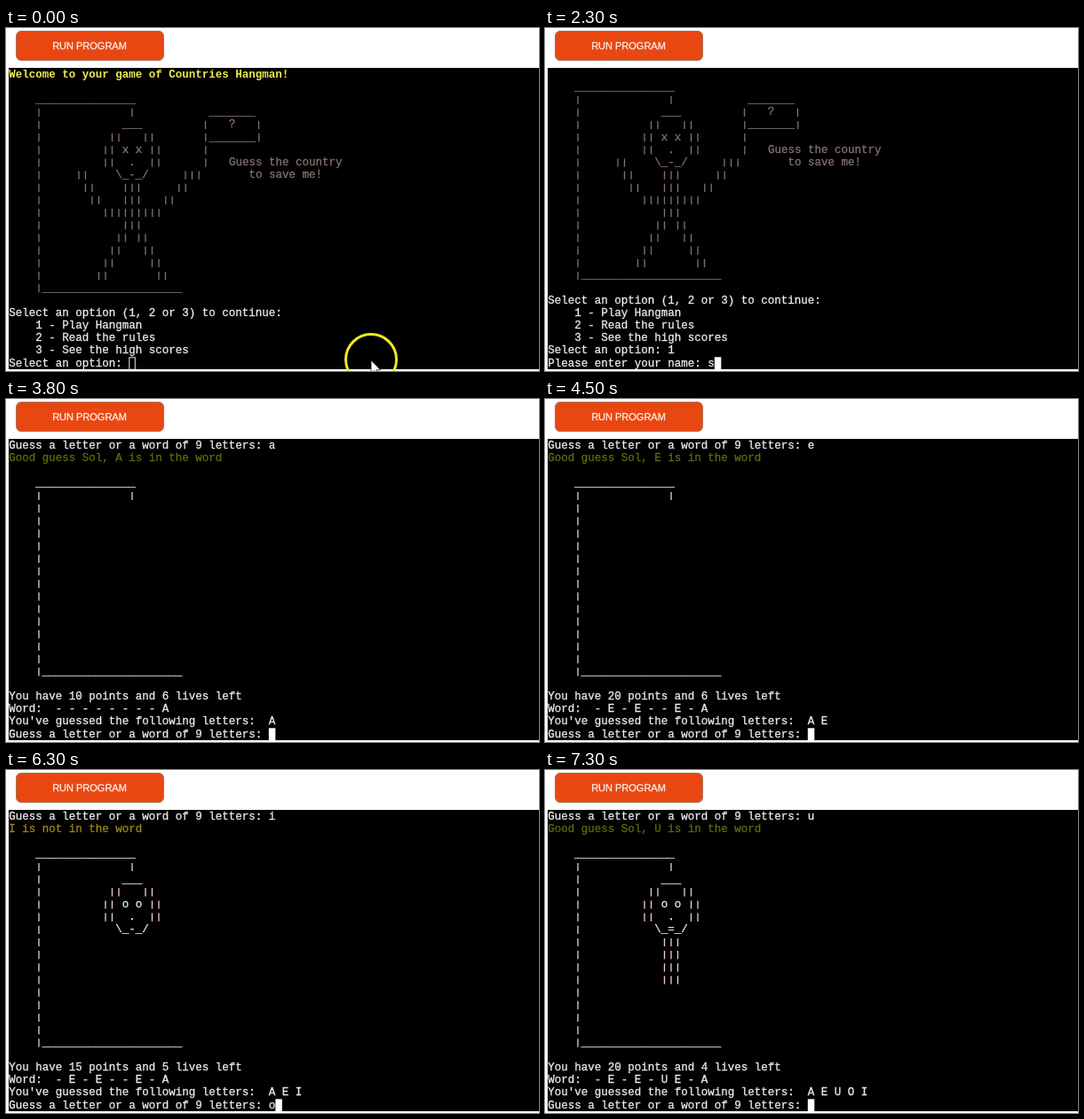
Animation of 600x387 px, one loop 8000 ms. Source, as an HTML page:

```html
<!DOCTYPE html>
<html lang="en">
<head>
<meta charset="utf-8">
<title>Countries Hangman</title>
<style>
html, body { margin: 0; width: 100%; height: 100%; overflow: hidden; background: #fff; }
#run {
  position: absolute; left: 10.5px; top: 3px; width: 167px; height: 33.5px; box-sizing: border-box;
  border: 1px solid #a8765a; border-radius: 6px; background: #e94711; color: #fdeee6;
  font: 11px/32px "Liberation Sans", Arial, sans-serif; text-align: center;
  -webkit-text-stroke: .3px;
}
#term { position: absolute; left: 2.5px; top: 45px; width: 598px; height: 340px; background: #000; overflow: hidden; }
/* double size, then halved, for exact 7.5px columns */
pre {
  margin: 0; width: 1196px; transform: translate(.3px, .8px) scale(.5); transform-origin: 0 0; color: #ececec;
  font: 25px/28.33px "Liberation Mono", "Courier New", monospace;
  -webkit-text-stroke: .6px;
}
pre div { height: 28.33px; }
i { display: inline-block; font-style: normal; color: #f0ccd0; clip-path: inset(5px 0); }
.dim, .dim i { color: #84716f; }
.title { color: #efeb50; font-weight: bold; -webkit-text-stroke: 0; }
.good { color: #566e10; }
.bad { color: #a0841c; }
.on { background: #fff; }
.off { box-shadow: inset 0 0 0 2px #e8e8e8; }
svg { position: absolute; left: 0; top: 0; }
</style>
</head>
<body>
<div id="run">RUN PROGRAM</div>
<div id="term"><pre id="screen"></pre></div>
<svg width="600" height="387">
  <g id="mouse">
    <circle r="28.5" cy="-1" fill="none" stroke="#f3ea1e" stroke-width="3"/>
    <path d="M0 0V15L3.500 11.700 6 17.500 8.500 16.400 6 10.800H10.500Z" fill="#fff" stroke="#222" stroke-width=".8"/>
  </g>
</svg>
<script>
const LOOP = 8000;
const NAME = "Sol";
const screen = document.getElementById("screen");
const mouse = document.getElementById("mouse");
const ON = '<span class="on"> </span>';
const OFF = '<span class="off"> </span>';

const line = (text, cls = "") =>
  `<div class="${cls}">${text.replace(/\|/g, "<i>|</i>")}</div>`;
const lines = (list, cls) => list.map(s => line(s, cls)).join("");

// Each part is [columns after the pole, characters].
function gallows(parts) {
  const rows = Array.from({ length: 14 }, (_, k) => {
    const [gap, s] = parts[k] || [0, ""];
    return "    |" + " ".repeat(gap) + s;
  });
  return ["    " + "_".repeat(15), ...rows, "    |" + "_".repeat(21)];
}

const menuArt = lines(gallows([
  [13, "|           _______"],
  [12, "___         |   ?   |"],
  [10, "||   ||       |_______|"],
  [9, "|| x x ||      |"],
  [9, "||  .  ||      |   Guess the country"],
  [5, "||    \\_-_/     |||       to save me!"],
  [6, "||    |||     ||"],
  [7, "||   |||   ||"],
  [9, "|||||||||"],
  [12, "|||"],
  [11, "|| ||"],
  [10, "||   ||"],
  [9, "||     ||"],
  [8, "||       ||"]
]), "dim");

const options = lines([
  "", "Select an option (1, 2 or 3) to continue:",
  "    1 - Play Hangman", "    2 - Read the rules", "    3 - See the high scores"
]);

const menu = (typed, cursor) =>
  line("Welcome to your game of Countries Hangman!", "title") + line("") +
  menuArt + options + line("Select an option: " + typed + cursor);

const askName = typed =>
  line("") + menuArt + options + line("Select an option: 1") +
  line("Please enter your name: " + typed + ON);

const rope = [[13, "|"]];
const head = mouth => [
  ...rope, [12, "___"], [10, "||   ||"], [9, "|| o o ||"], [9, "||  .  ||"], [11, `\\_${mouth}_/`]
];
const body = [...head("="), ...Array(4).fill([12, "|||"])];

const PROMPT = "Guess a letter or a word of 9 letters: ";

function game(first, note, cls, art, points, lives, word, used) {
  const top = line(first) + line(note, cls) + line("") + lines(gallows(art)) + lines([
    "", `You have ${points} points and ${lives} lives left`,
    "Word:  " + [...word].join(" "),
    "You've guessed the following letters:  " + [...used].join(" ")
  ]);
  return typed => top + line(PROMPT + typed + ON);
}
const hit = (c, ...rest) =>
  game(PROMPT + c.toLowerCase(), `Good guess ${NAME}, ${c} is in the word`, "good", ...rest);
const miss = (c, ...rest) =>
  game(PROMPT + c.toLowerCase(), `${c} is not in the word`, "bad", ...rest);

const typedName = NAME.toLowerCase();
const start = game("Please enter your name: " + typedName, "", "", rope, 0, 6, "---------", "");
const afterA = hit("A", rope, 10, 6, "--------A", "A");
const afterE = hit("E", rope, 20, 6, "-E-E--E-A", "AE");
const afterI = miss("I", head("-"), 15, 5, "-E-E--E-A", "AEI");
const afterO = miss("O", body, 10, 4, "-E-E--E-A", "AEIO");
const afterU = hit("U", body, 20, 4, "-E-E-UE-A", "AEUOI");

const scenes = [
  [0, menu("", OFF)], [700, menu("", ON)], [1200, menu("1", ON)],
  [1500, askName("")], [2300, askName(typedName[0])],
  [2400, askName(typedName.slice(0, 2))], [2600, askName(typedName)],
  [2800, start("")], [3800, afterA("")],
  [4400, afterA("e")], [4500, afterE("")],
  [5200, afterE("i")], [5500, afterI("")],
  [6300, afterI("o")], [6400, afterO("")],
  [7100, afterO("u")], [7300, afterU("")]
];

let shown;
function draw(now) {
  const t = now % LOOP;
  const scene = scenes.findLast(s => s[0] <= t);
  if (scene !== shown) screen.innerHTML = (shown = scene)[1];

  const step = Math.min(4, Math.floor(t / 100));
  mouse.setAttribute("transform", `translate(${411 - 4 * step} ${375 - 4 * step})`);
  mouse.style.display = t < 900 ? "" : "none";
}

const begin = performance.now();
function tick() {
  draw(performance.now() - begin);
  requestAnimationFrame(tick);
}
tick();
</script>
</body>
</html>
```
